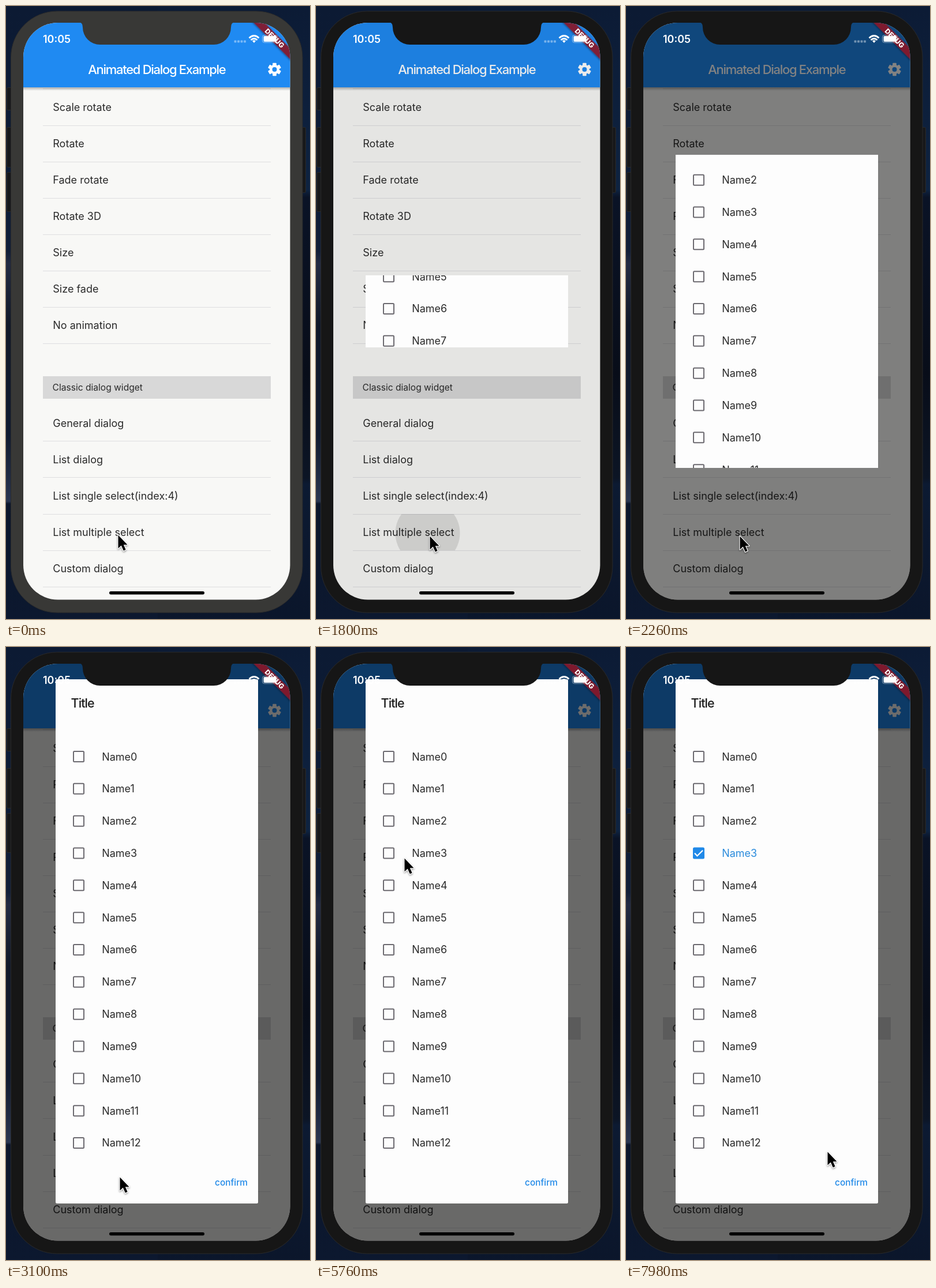
An HTML page for the animation above (8 s loop, 527 px wide and 1063 px high).

```html
<!DOCTYPE html>
<html lang="en">
<head>
<meta charset="utf-8">
<title>Animated dialog</title>
<style>
  html, body { margin: 0; width: 100%; height: 100%; overflow: hidden; background: #0a1a35; }
  svg { display: block; width: 100%; height: 100%; }
  text { font-family: Inter, "Open Sans", sans-serif; font-size: 18px; fill: #2a2a2a; }
  .bar { font-size: 22px; font-weight: 500; letter-spacing: -1.3px; fill: #fff; }
  .clock { font-size: 18px; font-weight: 600; fill: #fff; }
  .group { font-size: 15.6px; }
  .title { font-size: 21.5px; font-weight: 500; letter-spacing: -.9px; fill: #1c1c1c; }
  .confirm { font-size: 15.4px; font-weight: 500; fill: #2089e8; }
  .debug { font-size: 12px; font-weight: 800; fill: #fff; }
  .body { fill: #161616; }
  .idle .body { fill: #383836; }
  .box { fill: none; stroke: #6c6a70; stroke-width: 2; }
  .on .box { fill: #2089e8; stroke: #2089e8; }
  .on text { fill: #2a8bdc; }
  .tick { fill: none; stroke: #fff; stroke-width: 2.2; visibility: hidden; }
  .on .tick { visibility: visible; }
</style>
</head>
<body>
<svg id="stage" viewBox="0 0 527 1063">
  <defs>
    <linearGradient id="leftSky" x2="0" y2="1">
      <stop offset="0" stop-color="#0c1a33"/>
      <stop offset=".3" stop-color="#0d1c36"/>
      <stop offset=".4" stop-color="#121f38"/>
      <stop offset=".42" stop-color="#232b42"/>
      <stop offset=".52" stop-color="#101828"/>
      <stop offset=".7" stop-color="#111b30"/>
      <stop offset=".808" stop-color="#2a3650"/>
      <stop offset=".812" stop-color="#0b162b"/>
      <stop offset="1" stop-color="#0c182f"/>
    </linearGradient>
    <linearGradient id="rightSky" x2="0" y2="1">
      <stop offset="0" stop-color="#0c1b35"/>
      <stop offset=".3" stop-color="#0e2341"/>
      <stop offset=".312" stop-color="#0a1326"/>
      <stop offset=".6" stop-color="#080d19"/>
      <stop offset=".77" stop-color="#0c1525"/>
      <stop offset=".78" stop-color="#0c1a32"/>
      <stop offset="1" stop-color="#0b162b"/>
    </linearGradient>
    <linearGradient id="shade" x2="0" y2="1">
      <stop offset="0" stop-opacity=".28"/>
      <stop offset="1" stop-opacity="0"/>
    </linearGradient>
    <filter id="soft" x="-50%" y="-50%" width="200%" height="200%">
      <feDropShadow dx="0" dy="1.5" stdDeviation="1.5" flood-opacity=".45"/>
    </filter>
    <clipPath id="screen"><rect x="30" y="29" width="462.5" height="1000.5" rx="60"/></clipPath>
    <clipPath id="tile"><rect x="64" y="881" width="395" height="63"/></clipPath>
    <clipPath id="reveal"><rect id="window" x="30" width="463"/></clipPath>
  </defs>

  <rect width="264" height="1063" fill="url(#leftSky)"/>
  <rect x="263" width="264" height="1063" fill="url(#rightSky)"/>

  <g fill="#17181a" stroke="#2a2a2a">
    <rect x="1.5" y="141.5" width="12" height="39" rx="2"/>
    <rect x="1.5" y="210.5" width="12" height="69" rx="2"/>
    <rect x="1.5" y="288.5" width="12" height="68" rx="2"/>
    <rect x="508" y="210.5" width="11.5" height="113" rx="2"/>
    <rect class="body" x="8.5" y="9" width="505.5" height="1043" rx="80"/>
  </g>

  <g clip-path="url(#screen)">
    <rect x="30" y="29" width="463" height="1001" fill="#f8f8f6"/>
    <g id="list"></g>
    <g clip-path="url(#tile)"><circle id="ripple" cx="193.5" cy="914"/></g>
    <rect x="30" y="141" width="463" height="6" fill="url(#shade)"/>
    <rect x="30" y="29" width="463" height="112" fill="#1f8af2"/>
    <text class="bar" x="261.3" y="118" text-anchor="middle">Animated Dialog Example</text>
    <g id="gear" transform="translate(465.5 110)" fill="#fff"></g>
    <rect id="barrier" x="30" y="29" width="463" height="1001"/>

    <g clip-path="url(#reveal)">
      <rect x="86" y="56" width="351" height="909" rx="2.5" fill="#fdfdfd"/>
      <text class="title" x="112.5" y="104.5">Title</text>
      <g id="names"></g>
      <text class="confirm" x="362" y="934">confirm</text>
    </g>

    <g transform="translate(492.5 29) rotate(45)">
      <rect x="-60" y="31.2" width="120" height="13.4" fill="#8a1b2a" fill-opacity=".88" filter="url(#soft)"/>
      <text class="debug" y="42.300" text-anchor="middle">DEBUG</text>
    </g>

    <text class="clock" x="64" y="63.5">10:05</text>
    <g fill="#fff" fill-opacity=".4">
      <rect x="395.5" y="59.5" width="4" height="4" rx="1"/>
      <rect x="401" y="59.5" width="4" height="4" rx="1"/>
      <rect x="406.5" y="59.5" width="4" height="4" rx="1"/>
      <rect x="412" y="59.5" width="4" height="4" rx="1"/>
    </g>
    <g fill="none" stroke="#fff" stroke-width="2.7">
      <path d="M421.5 55.5Q430 47.5 438.5 55.5M424.5 59Q430 54 435.5 59"/>
      <path d="M427 60.5Q430 58 433 60.5L430 64Z" fill="#fff" stroke="none"/>
    </g>
    <rect x="444.5" y="50.5" width="26" height="13" rx="3.5" fill="none" stroke="#fff" stroke-opacity=".5"/>
    <rect x="446.5" y="52" width="22" height="10" rx="2" fill="#fff"/>
    <path d="M472.5 54.5Q475 57 472.5 59.5Z" fill="#fff" fill-opacity=".5"/>
    <rect x="179" y="1015" width="165" height="5.5" rx="2.75"/>
  </g>

  <path class="body" d="M126 28H127Q133 29 133 37A30 30 0 0 0 163 67H360A30 30 0 0 0 390 37Q390 29 396 28Z"/>

  <g id="cursor" filter="url(#soft)">
    <path d="M1.5 1.5V24.500L6.800 19.600L10.800 28.500L14.600 26.800L10.800 18.200H17.500Z"
      stroke="#fff" stroke-width="2.2" stroke-linejoin="round" paint-order="stroke"/>
  </g>
</svg>

<script>
  const LOOP = 8000;
  const SCREEN = { top: 29.5, height: 1000 };
  const $ = id => document.getElementById(id);

  const effects = ['Scale rotate', 'Rotate', 'Fade rotate', 'Rotate 3D', 'Size', 'Size fade', 'No animation'];
  const dialogs = ['General dialog', 'List dialog', 'List single select(index:4)', 'List multiple select', 'Custom dialog'];

  const line = y => `<rect x="64" y="${y}" width="395" height="1" fill="#dedee0"/>`;
  const rows = (labels, top) => labels.map((label, i) => {
    const y = top + 63.1 * i;
    return `<text x="81.3" y="${y + 6.5}">${label}</text>${line(Math.round(y + 31.3))}`;
  }).join('');

  $('list').innerHTML = line(143) + rows(effects, 175.3) +
    '<rect x="64" y="642" width="395" height="39" fill="#d8d8d8"/>' +
    '<text class="group" x="80.5" y="666.5">Classic dialog widget</text>' +
    rows(dialogs, 723);

  $('names').innerHTML = Array.from({ length: 13 }, (_, i) =>
    `<g transform="translate(126 ${190 + 55.83 * i})">
      <rect class="box" x="-9" y="-9" width="18" height="18" rx="1.5"/>
      <path class="tick" d="M-7 0L-2.5 4.7L7 -4.8"/>
      <text x="40.2" y="6.5">Name${i}</text>
    </g>`).join('');

  $('gear').innerHTML = [0, 60, 120].map(a =>
    `<rect x="-3.3" y="-11.3" width="6.6" height="22.6" rx="1" transform="rotate(${a})"/>`).join('') +
    '<circle r="8.3"/><circle r="4" fill="#1f8af2"/>';

  function stepAt(ms) {
    const rest = ms % 140;
    return 3 * Math.floor(ms / 140) + (rest < 20 ? 0 : rest < 120 ? 1 : 2);
  }

  const linear = k => k;
  const smooth = k => k * k * (3 - 2 * k);

  // Value at a step, from [step, value] points.
  function track(step, points, ease = linear) {
    const next = points.findIndex(p => p[0] > step);
    if (next === 0) return points[0][1];
    if (next < 0) return points[points.length - 1][1];
    const [s0, v0] = points[next - 1], [s1, v1] = points[next];
    return v0 + (v1 - v0) * ease((step - s0) / (s1 - s0));
  }

  const open = [[34.5, 0], [38, .125], [44, .339], [49, .543], [60, 1]];
  const dim = [[34.5, 0], [38, .08], [44, .355], [49, .49], [60, .575]];
  const inkSize = [[34, 0], [38, 56], [44, 150], [48, 215]];
  const inkFade = [[33, 0], [35, .11], [38, .11], [44, .05], [47, 0]];
  const cursorX = [[18, 193], [28, 196], [88, 196], [114, 152], [148, 152], [171, 348]];
  const cursorY = [[18, 916], [28, 918], [88, 918], [114, 365], [148, 365], [171, 874]];
  const FOCUS = 18, PICK = 131;
  const picked = $('names').children[3];

  function draw(ms) {
    const step = stepAt(ms);
    const height = SCREEN.height * track(step, open);
    $('window').setAttribute('y', SCREEN.top + (SCREEN.height - height) / 2);
    $('window').setAttribute('height', height);
    $('barrier').setAttribute('opacity', track(step, dim));
    $('ripple').setAttribute('r', track(step, inkSize));
    $('ripple').setAttribute('opacity', track(step, inkFade));
    $('stage').classList.toggle('idle', step < FOCUS);
    picked.classList.toggle('on', step >= PICK);
    const x = track(step, cursorX, smooth), y = track(step, cursorY, smooth);
    $('cursor').setAttribute('transform', `translate(${x} ${y})`);
  }

  const start = performance.now();
  function loop() {
    draw((performance.now() - start) % LOOP);
    requestAnimationFrame(loop);
  }
  loop();
</script>
</body>
</html>
```
